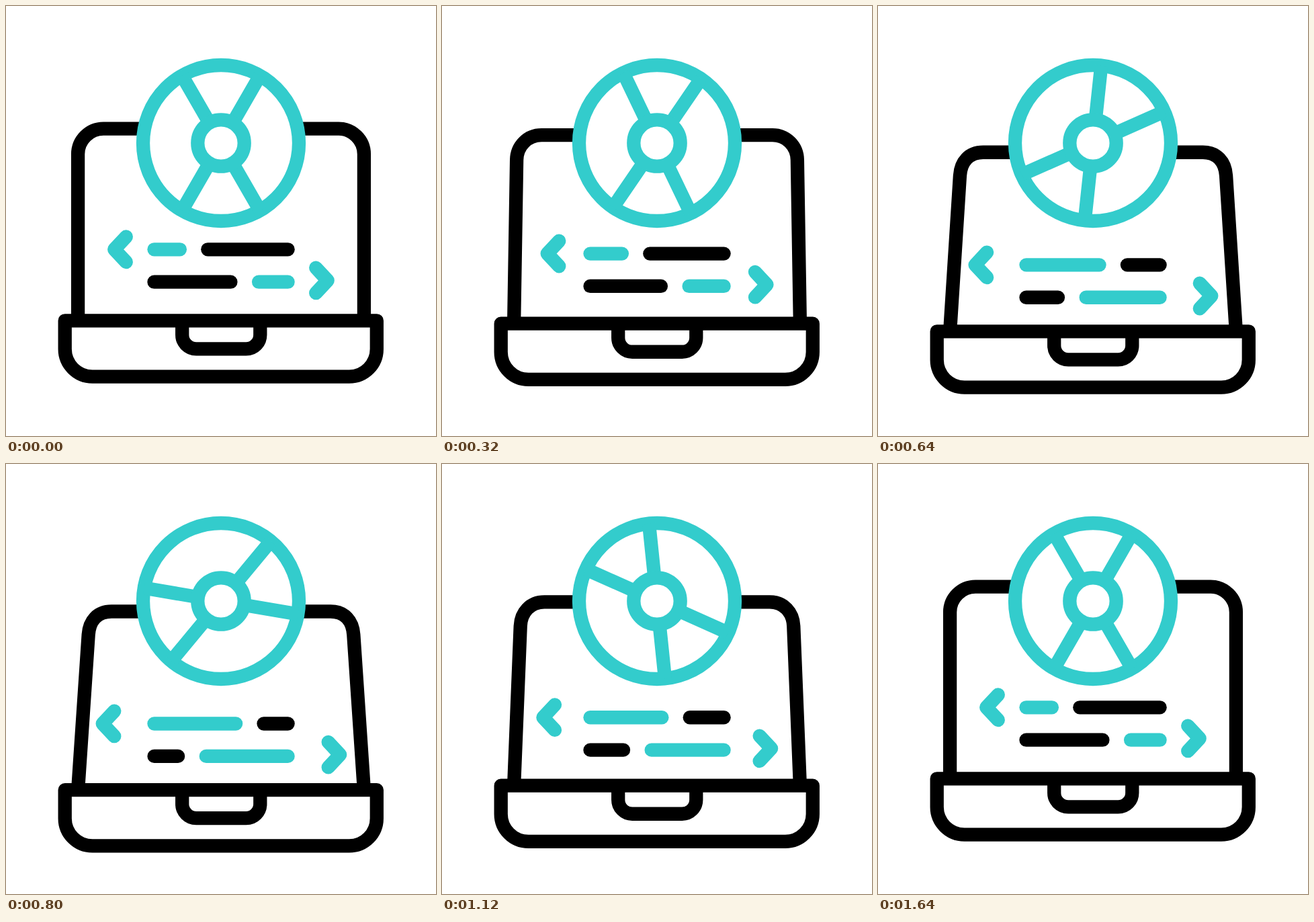
Recreate the animation shown at these times as an HTML page. Size 640 px wide and 640 px high, loop 1.68 s.

```html
<!DOCTYPE html>
<html lang="en">
<head>
<meta charset="utf-8">
<title>Laptop and disc</title>
<style>
html, body { margin: 0; width: 100%; height: 100%; overflow: hidden; background: #fff; }
svg { display: block; width: 100%; height: 100%; }
g, path, circle { fill: none; stroke-width: 20.3; stroke-linejoin: round; }
.ink { stroke: #000; }
.teal { stroke: #3cc; }
.round { stroke-linecap: round; }
</style>
</head>
<body>
<svg viewBox="0 0 640 640">
  <path id="lid" class="ink"/>
  <g id="base" class="ink">
    <path d="M87.7 468.3H551.8V510.5A41 41 0 0 1 510.8 551.6H128.7A41 41 0 0 1 87.7 510.5Z"/>
    <path d="M262.2 468.3V489.4A21 21 0 0 0 283.2 510.4H357.3A21 21 0 0 0 378.3 489.4V468.3"/>
  </g>
  <g id="code" class="round">
    <path id="tealA" class="teal"/>
    <path id="inkA" class="ink"/>
    <path id="inkB" class="ink"/>
    <path id="tealB" class="teal"/>
    <path id="open" class="teal" d="M178.8 343.5L161.2 362.3L178.8 381"/>
    <path id="close" class="teal" d="M461.2 389.7L478.7 408.5L461.2 427.2"/>
  </g>
  <g class="teal">
    <circle cx="320" cy="204" r="116" style="fill:#fff"/>
    <path id="spokes" d="M262 103.5L378 304.5M378 103.5L262 304.5"/>
    <circle cx="320" cy="204" r="34.7" style="fill:#fff"/>
  </g>
</svg>
<script>
const LOOP = 1680, STEP = 40;
const $ = id => document.getElementById(id);
const set = (id, name, value) => $(id).setAttribute(name, value);
const move = (id, x, y) => set(id, 'transform', `translate(${x} ${y})`);

// Symmetric cubic Bezier ease, handles at 0.553 and 0.447
function ease(t, from, to) {
  const x = (t - from) / (to - from);
  if (x <= 0) return 0;
  if (x >= 1) return 1;
  let lo = 0, hi = 1;
  for (let i = 0; i < 30; i++) {
    const s = (lo + hi) / 2;
    if (s + 0.66 * s * (1 - s) * (1 - 2 * s) < x) lo = s;
    else hi = s;
  }
  return lo * lo * (3 - 2 * lo);
}

// Half of the lid outline; the right half mirrors around x = 320
function lidSide(p, mirror) {
  const X = x => mirror ? 640 - x : x;
  const sx = 107.1 + 15.6 * p, sy = 220.5 + 33.5 * p;
  const tx = 145 + 12 * p, ty = 182.7 + 36.8 * p;
  return `M${X(107.1)} ${468.3 + 16.8 * p}L${X(sx)} ${sy}` +
    `C${X(sx + 1.4 * p)} ${sy - 20.8} ${X(tx - 20.8)} ${ty} ${X(tx)} ${ty}H${X(205)}`;
}

const bar = (id, x1, x2, y) => set(id, 'd', `M${x1} ${y}H${x2}`);

function draw(t) {
  const tilt = ease(t, 36, 780) - ease(t, 785, 1535);
  const swap = ease(t, 115, 885) - ease(t, 873, 1605);
  const a = 84.5 * swap, b = 79.5 * swap;

  set('lid', 'd', lidSide(tilt, false) + lidSide(tilt, true));
  move('base', 0, 16.8 * tilt);
  move('code', 0, 24.2 * tilt);
  move('open', -17.5 * tilt, 0);
  move('close', 18.5 * tilt, 0);

  bar('tealA', 220.5, 258.9 + a, 362.3);
  bar('inkA', 300.3 + a, 419.6, 362.3);
  bar('inkB', 220.5, 334.4 - b, 410.7);
  bar('tealB', 376.1 - b, 419.6, 410.7);

  set('spokes', 'transform', `rotate(${180 * ease(t, 107, 1652)} 320 204)`);
}

const start = performance.now();
function tick() {
  const t = (performance.now() - start) % LOOP;
  draw(t < 2 * STEP ? 0 : Math.floor(t / STEP) * STEP);
  requestAnimationFrame(tick);
}
tick();
</script>
</body>
</html>
```
